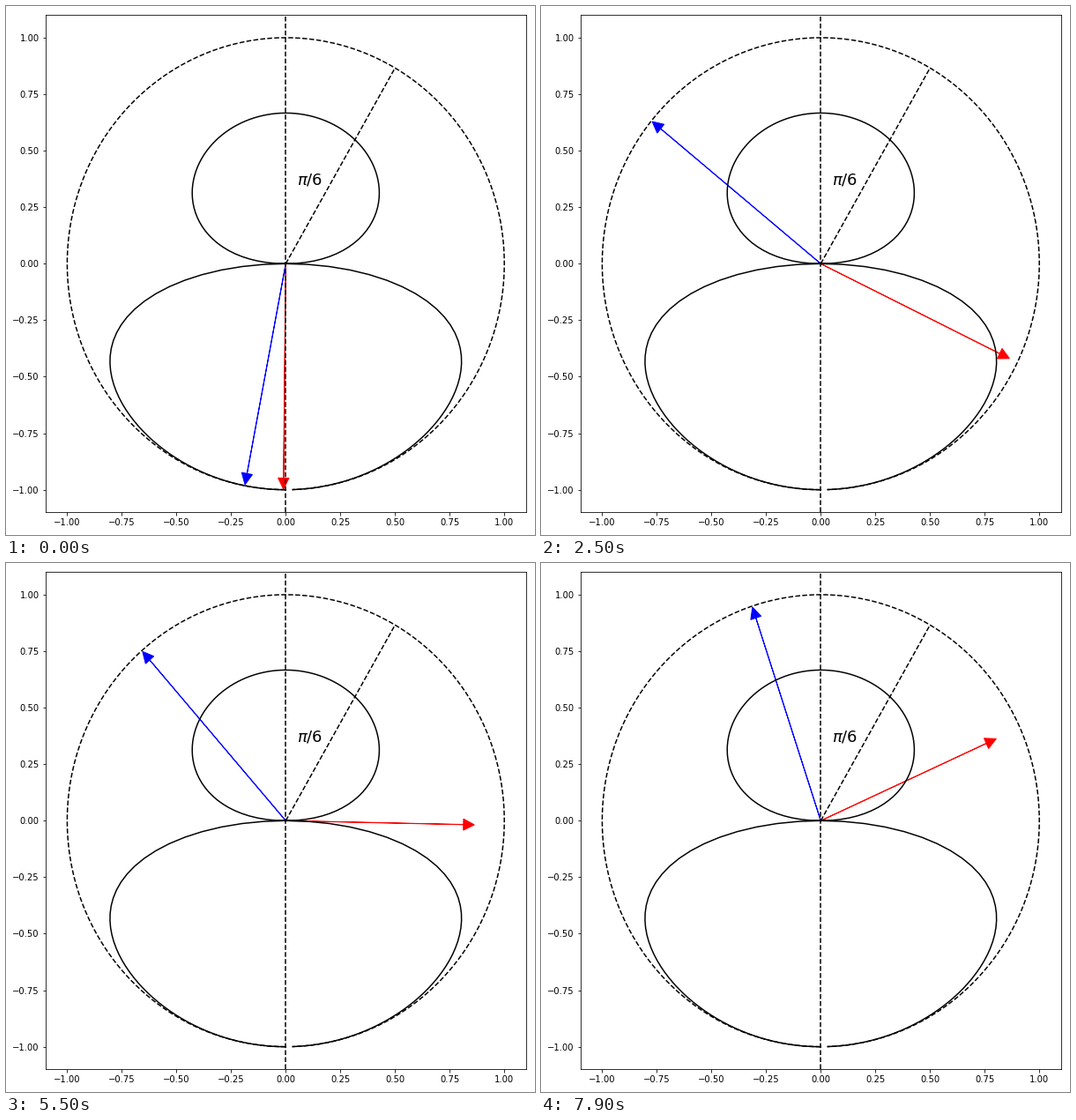
A matplotlib script that plays this animation: 600 by 600 pixels, repeating every 8000 ms.

```python
import numpy as np
import matplotlib.pyplot as plt
from matplotlib.animation import FuncAnimation

SIZE, DPI = 600, 72
FRAMES, INTERVAL = 80, 100

plt.rcParams["font.family"] = "DejaVu Sans"
fig = plt.figure(figsize=(SIZE / DPI, SIZE / DPI), dpi=DPI, facecolor="white")
ax = fig.add_axes([44.6 / SIZE, 25.7 / SIZE, 545.4 / SIZE, 564 / SIZE])
ax.set(xlim=(-1.1, 1.1), ylim=(-1.1, 1.1))
ticks = np.linspace(-1, 1, 9)
ax.set_xticks(ticks)
ax.set_yticks(ticks)


def polar(r, phi):
    """Point at distance r, phi measured clockwise from the top."""
    return r * np.sin(phi), r * np.cos(phi)


def lobes(phi):
    """Small saturating lobe above the axis, large one below."""
    c = np.cos(phi)
    a = np.abs(c)
    upper = 2 / 3 * (1 - np.exp(-1.93 * a)) / (1 - np.exp(-1.93))
    lower = np.tanh(3.23 * a) / np.tanh(3.23)
    return np.where(c > 0, upper, lower)


phi = np.linspace(-np.pi, np.pi, 200, endpoint=False)
ax.plot(*polar(lobes(phi), phi), "k-", lw=1.5)
ax.plot(*polar(1, phi), "k--", lw=1.5)
ax.axvline(0, color="k", ls="--", lw=1.5)
ax.plot([0, 0.5], [0, np.sqrt(3) / 2], "k--", lw=1.5)
ax.text(0.05, 0.35, r"$\pi$/6", fontsize=18)

# Headings in degrees clockwise from the bottom, at key times in frames
KEYS = [0, 16, 25, 38, 55, 70, 79]
BLUE = [10.8, 50.8, 129.2, 124.2, 138.8, 151.7, 161.7]
RED = [0.6, 3.4, -64.1, -93.8, -88.8, -106.2, -114.3]
RED_LEN = [0.998, 0.963, 0.96, 0.95, 0.863, 0.882, 0.881]


def make_arrow(color):
    return ax.arrow(0, 0, 0, -1, color=color, width=0.001, head_width=0.05,
                    head_length=0.05, length_includes_head=True)


blue, red = make_arrow("blue"), make_arrow("red")


def aim(arrow, degrees, length):
    dx, dy = polar(length, np.radians(degrees) + np.pi)
    arrow.set_data(dx=dx, dy=dy)


def update(i):
    aim(blue, np.interp(i, KEYS, BLUE), 0.995)
    aim(red, np.interp(i, KEYS, RED), np.interp(i, KEYS, RED_LEN))
    return blue, red


anim = FuncAnimation(fig, update, frames=FRAMES, interval=INTERVAL,
                     repeat=True, repeat_delay=0)
plt.show()
```
